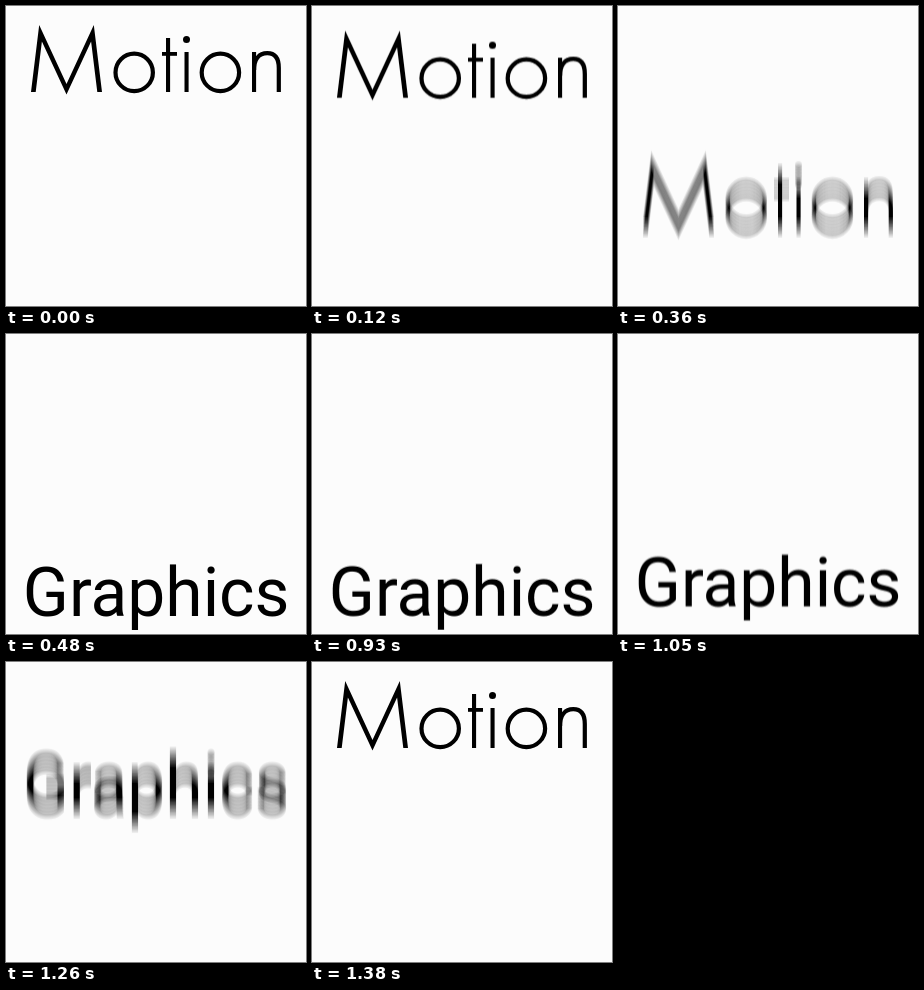
Write an HTML page with a canvas that moves like this. It is 300 by 300 pixels and loops after 1.8 s.

```html
<!DOCTYPE html>
<html lang="en">
<head>
<meta charset="utf-8">
<title>Motion Graphics</title>
<style>
  html, body { margin: 0; width: 100%; height: 100%; overflow: hidden; background: #fcfcfc; }
  canvas { display: block; width: 300px; height: 300px; }
</style>
</head>
<body>
<canvas id="stage" width="300" height="300"></canvas>
<script>
const SIZE = 300;
const STEP = 30;        // ms per drawn frame
const HALF = 30;        // frames per word
const MOVE = 16;        // frames spent moving
const CUT = 13;         // frame at which the words swap
const TRAVEL = 197;
const SAMPLES = 16;
const SHUTTER = 0.5;    // open part of each frame

const ctx = document.getElementById('stage').getContext('2d');

function layer(paint) {
  const c = document.createElement('canvas');
  c.width = c.height = SIZE;
  const g = c.getContext('2d');
  if (paint) paint(g);
  return c;
}

function paintMotion(g) {
  const ring = (x, y, r) => {
    g.beginPath();
    g.arc(x, y, r, 0, Math.PI * 2);
    g.stroke();
  };
  g.lineWidth = 4.2;

  // M
  g.beginPath();
  [[25, 86], [33.2, 19], [60.5, 78], [87.8, 19], [96, 86], [91.3, 86],
   [85.1, 35.4], [60.5, 88.5], [35.9, 35.4], [29.7, 86]]
    .forEach(([x, y]) => g.lineTo(x, y));
  g.fill();

  ring(128.2, 66.4, 18.7);
  ring(214.4, 66.4, 18.7);

  // t
  g.fillRect(160, 32, 4.1, 54);
  g.fillRect(156, 46, 15, 3.8);

  // i
  g.fillRect(178.5, 46, 4.1, 40);
  g.beginPath();
  g.arc(180.5, 33.4, 3.5, 0, Math.PI * 2);
  g.fill();

  // n
  g.fillRect(246, 46, 4.1, 40);
  g.beginPath();
  g.moveTo(248.1, 64);
  g.bezierCurveTo(248.1, 53, 253, 47.2, 261.3, 47.2);
  g.bezierCurveTo(269.5, 47.2, 272.8, 52.5, 272.8, 62);
  g.lineTo(272.8, 86);
  g.stroke();
}

function paintGraphics(g) {
  g.font = '400 67.7px Roboto, sans-serif';
  g.textBaseline = 'alphabetic';
  g.fillText('Graphics', 16.8, 282);
}

// Eased progress: cubic Bezier (.94, 0, .584, 1)
function ease(x) {
  if (x <= 0) return 0;
  if (x >= 1) return 1;
  let lo = 0, hi = 1;
  for (let i = 0; i < 30; i++) {
    const s = (lo + hi) / 2, r = 1 - s;
    const bx = 3 * r * r * s * 0.94 + 3 * r * s * s * 0.584 + s * s * s;
    if (bx < x) lo = s; else hi = s;
  }
  return lo * lo * (3 - 2 * lo);
}

const words = [layer(paintMotion), layer(paintGraphics)];
const blur = layer();
const bctx = blur.getContext('2d');

function draw(ms) {
  const n = Math.floor(ms / STEP) % (HALF * 2);
  const leg = Math.floor(n / HALF);
  const frame = n % HALF;
  const dir = leg ? -1 : 1;
  const swapped = frame >= CUT;
  const word = words[swapped ? 1 - leg : leg];

  ctx.fillStyle = '#fcfcfc';
  ctx.fillRect(0, 0, SIZE, SIZE);
  if (frame === 0 || frame >= MOVE) {
    ctx.drawImage(word, 0, 0);
    return;
  }

  bctx.clearRect(0, 0, SIZE, SIZE);
  bctx.globalCompositeOperation = 'lighter';
  bctx.globalAlpha = 1 / SAMPLES;
  for (let i = 0; i < SAMPLES; i++) {
    const at = frame + ((i + 0.5) / SAMPLES - 0.5) * SHUTTER;
    const p = ease(at / MOVE) - (swapped ? 1 : 0);
    bctx.drawImage(word, 0, dir * p * TRAVEL);
  }
  ctx.drawImage(blur, 0, 0);
}

const start = performance.now();
function tick() {
  draw(performance.now() - start);
  requestAnimationFrame(tick);
}
tick();
</script>
</body>
</html>
```
